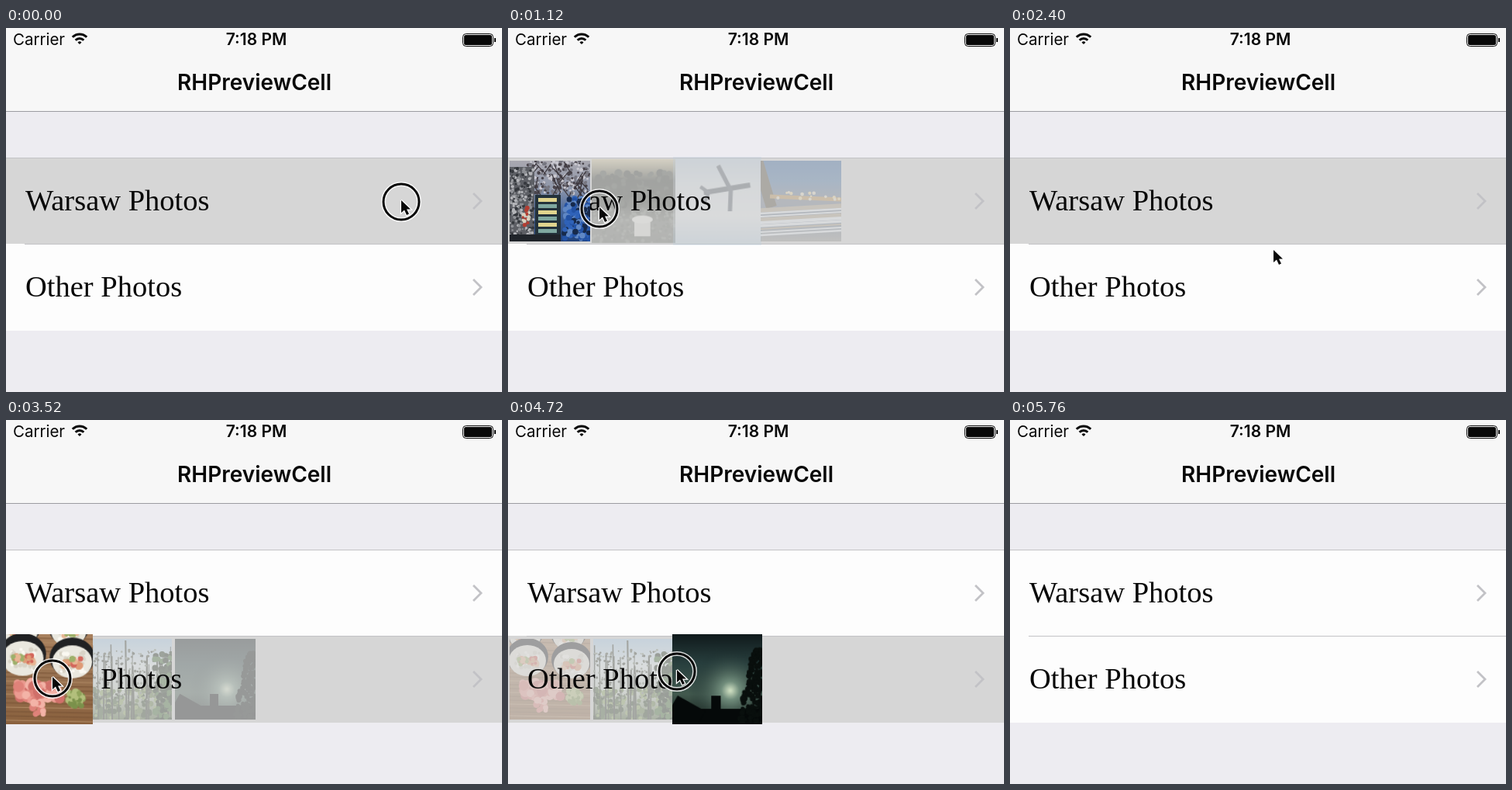
An HTML page with a canvas that plays this animation: 640 by 469 pixels, repeating every 6000 ms.

```html
<!DOCTYPE html>
<html lang="en">
<head>
<meta charset="utf-8">
<title>RHPreviewCell</title>
<style>
  html, body { margin: 0; width: 640px; height: 469px; overflow: hidden; }
  canvas { display: block; }
</style>
</head>
<body>
<canvas id="stage" width="640" height="469"></canvas>
<script>
const c = document.getElementById('stage').getContext('2d');
const LOOP = 6000, STEP = 80, TILE = 104, PITCH = 108, ROW = 112, DIM = 0.3, INK = '#080808';

const mix = (a, b, p) => a + (b - a) * p;
function ease(v) {
  v = Math.max(0, Math.min(1, v));
  return v * v * (3 - 2 * v);
}

let seed = 1;
function random(from, to) {
  seed = seed * 16807 % 2147483647;
  return mix(from, to, seed / 2147483647);
}

function rect(color, x, y, w, h) {
  c.fillStyle = color;
  c.fillRect(x, y, w, h);
}

function oval(color, x, y, rx, ry = rx) {
  c.fillStyle = color;
  c.beginPath();
  c.ellipse(x, y, rx, ry, 0, 0, 7);
  c.fill();
}

function line(color, width, ...points) {
  c.beginPath();
  for (let i = 0; i < points.length; i += 2) c.lineTo(points[i], points[i + 1]);
  c.strokeStyle = color;
  c.lineWidth = width;
  c.stroke();
}

function text(s, x, y, font, align = 'left') {
  c.font = font;
  c.textAlign = align;
  c.fillStyle = INK;
  c.fillText(s, x, y);
}

function sky(...colors) {
  const g = c.createLinearGradient(0, 0, 0, TILE);
  colors.forEach((color, i) => g.addColorStop(i / (colors.length - 1), color));
  rect(g, 0, 0, TILE, TILE);
}

// Random dots filling a box
function scatter(colors, count, x, y, w, h, size) {
  for (let i = 0; i < count; i++) {
    oval(colors[i % colors.length], random(x, x + w), random(y, y + h), random(size / 2, size));
  }
}

// Simplified photos, each in a square of side TILE
function city() {
  sky('#a9a8b0', '#8f97aa', '#3f629c', '#22427a');
  scatter(['#4a454c', '#777781', '#c9c8d0'], 260, 24, 0, 80, 42, 2.4);
  for (let i = 0; i < 30; i++) {
    const x = random(25, 104), y = random(0, 45);
    line('#3c373d', 1.2, x, y, x + random(-14, 14), y + 14);
  }
  rect('#5d5f65', 0, 8, 32, 96);
  scatter(['#35383d', '#8e9095', '#b4b5b9'], 240, 0, 10, 31, 94, 2.2);
  scatter(['#172a4b', '#5f87c4', '#2352a4', '#2f62b8'], 150, 70, 48, 34, 54, 4);
  scatter(['#b33d32', '#d9d2c0'], 14, 17, 60, 10, 24, 3);
  rect('#24323b', 33, 44, 33, 60);
  for (let y = 48; y < 90; y += 8) rect(y % 16 ? '#7fa8a0' : '#e0d48e', 37, y, 24, 5);
  rect('#20242a', 0, 95, 66, 9);
}

function meadow() {
  sky('#d0c297', '#2b3028', '#33372f', '#6d7068', '#62665f');
  scatter(['#2b3028', '#3d4238'], 90, 0, 16, TILE, 42, 5);
  scatter(['#7c8078', '#5f635b'], 200, 0, 62, TILE, 42, 2.5);
  rect('#d8d8d2', 53, 74, 20, 22);
  oval('#e4e4de', 63, 75, 13, 5);
}

function plane() {
  sky('#b9cbdb', '#d7dfe5', '#e2e6e8', '#b9cede');
  line('#4a535e', 6, 36, 42, 91, 33);
  line('#525b66', 5, 53, 10, 68, 39, 67, 64);
  line('#525b66', 4, 32, 35, 42, 42, 37, 53);
}

function night() {
  sky('#2c5c98', '#416d9f', '#6c7584', '#5d7089', '#8f8f8b');
  line('#4f4636', 14, -4, 0, 14, 60);
  line('#b28a4c', 5, 12, 46, TILE, 50);
  scatter(['#e5cf94', '#ddd5bd'], 14, 20, 40, 82, 12, 2.5);
  for (let i = 0; i < 9; i++) line(i % 3 ? '#dfe5ea' : '#a99b84', random(2, 6), 0, 64 + i * 4, TILE, 58 + i * 4);
}

function roll(x, y, r) {
  oval('#202123', x, y - 3, r + 3, r);
  oval('#eae8df', x, y + 2, r, r - 4);
  scatter(['#fbf9f2', '#d8d3c6'], 40, x - r * 0.65, y - r * 0.4, r * 1.3, r, 3);
  scatter(['#df9b76', '#9db06a', '#d3665b', '#e8b694'], 26, x - r / 2, y - 2, r, r / 2.5, 4);
}

function sushi() {
  sky('#a9815e', '#96704f', '#8a613e');
  for (let y = 4; y < TILE; y += 5) line(y % 3 ? '#7a5537' : '#b08a64', 1, 0, y, TILE, y + 2);
  roll(20, -4, 20);
  roll(76, -4, 20);
  roll(23, 26, 24);
  roll(80, 30, 23);
  scatter(['#df8279', '#f3b3a7', '#d0706a', '#eb9a90'], 60, 16, 56, 50, 20, 7);
  scatter(['#df8279', '#f3b3a7'], 18, 34, 76, 14, 18, 5);
  scatter(['#91a45c', '#b3bf7c', '#7b914b'], 50, 76, 66, 16, 18, 4);
}

function trunks(color, count, top) {
  for (let i = 0; i < count; i++) {
    const x = random(0, TILE);
    line(color, random(0.8, 2.2), x, random(0, top), x + random(-2, 2), TILE);
  }
}

function forest() {
  sky('#a7ccea', '#e3edf0', '#c5d0c4', '#50663b');
  scatter(['#425b32', '#5f7a41', '#87a05b', '#2a3d20'], 160, 0, 64, TILE, 40, 4);
  trunks('#30382c', 24, 45);
  scatter(['#30382c', '#4a5140', '#7d8a78'], 200, 0, 14, TILE, 66, 1.8);
  scatter(['#1c3019', '#12200f', '#3d6730'], 120, 82, 18, 22, 86, 4);
}

function dusk() {
  sky('#101a1c', '#29403f', '#42594e', '#101815');
  const glow = c.createRadialGradient(67, 65, 1, 67, 65, 48);
  glow.addColorStop(0, '#cbdcbf');
  glow.addColorStop(0.2, '#718d7c');
  glow.addColorStop(1, '#17282800');
  rect(glow, 0, 0, TILE, TILE);
  rect('#050909', 0, 86, TILE, 18);
  rect('#050909', 45, 71, 11, 20);
  line('#050909', 26, 0, 82, 32, 100);
  for (let y = 18; y < TILE; y += 4) scatter(['#090f0d'], 7, 96 - y / 5, y, 8 + y / 5, 4, 3.5);
}

// The finger goes down at `on` and up at `up`
const rows = [
  { title: 'Warsaw Photos', top: 167, on: 0, up: 2000, photos: [city, meadow, plane, night] },
  { title: 'Other Photos', top: 278, on: 3120, up: 5200, photos: [sushi, forest, dusk] }
];

// Key points of the pointer: time, x, y
const path = [
  [0, 510, 224], [640, 510, 224], [1120, 118, 233], [1200, 60, 234], [1920, 446, 226],
  [2400, 340, 288], [2640, 108, 356], [2800, 60, 333], [4080, 60, 333], [4160, 190, 329],
  [4440, 260, 326], [4720, 218, 324], [5120, 395, 330], [5600, 470, 425]
];

function pointer(t) {
  const i = path.findIndex(key => key[0] > t);
  if (i < 1) return null;
  const [from, to] = [path[i - 1], path[i]];
  const p = (t - from[0]) / (to[0] - from[0]);
  return [mix(from[1], to[1], p), mix(from[2], to[2], p)];
}

// Index of the photo under the finger; touches run slightly ahead of the drawn pointer
function hovered(row, t) {
  if (t < row.on + 120 || t >= row.up) return -1;
  return Math.floor(pointer(t + 20)[0] / PITCH);
}

function drawPointer(t) {
  const at = pointer(t);
  if (!at) return;
  const [x, y] = at;
  if (rows.some(row => t >= row.on - 320 && t < row.up)) {
    for (const [color, width] of [['#ffffffd0', 6], [INK, 3]]) {
      c.beginPath();
      c.arc(x, y, 23, 0, 7);
      c.strokeStyle = color;
      c.lineWidth = width;
      c.stroke();
    }
  }
  c.save();
  c.translate(x, y - 2);
  line('#fff', 2.5, 0, 0, 0, 16, 4, 12.5, 7, 19, 10, 17.5, 7, 11.5, 12, 11.5, 0, 0);
  c.fillStyle = INK;
  c.fill();
  c.restore();
}

function drawTile(row, i, t, lit) {
  const enter = ease((t - row.on - 120 - i * 30) / 150);
  const leave = ease((t - row.up - i * 20) / 180);
  let held = 0;
  for (let k = 1; k <= 3; k++) held += hovered(row, t - k * STEP) === i;
  const size = TILE * (1 + 0.12 * ease(held / 3));
  const x = mix(-60, 54 + i * PITCH, enter * (1 - leave));
  c.globalAlpha = lit ? 1 : DIM;
  c.drawImage(row.images[i], x - size / 2, row.top + ROW / 2 - size / 2, size, size);
  c.globalAlpha = 1;
}

function drawRow(row, t) {
  const pressed = t >= row.on ? 1 - ease((t - row.up - 400) / 140) : 0;
  const v = Math.round(mix(253, 214, pressed));
  rect(`rgb(${v},${v},${v})`, 0, row.top, 640, ROW);
  const y = row.top + ROW / 2;
  line('#c2c2c6', 2.8, 603, y - 10, 613, y, 603, y + 10);
}

// Dimmed photos lie under the title, the lit one covers it
function drawPhotos(row, t) {
  const current = hovered(row, t);
  row.images.forEach((_, i) => i !== current && drawTile(row, i, t, false));
  text(row.title, 25, row.top + 68, '38.5px "Liberation Serif", serif');
  if (row.images[current]) drawTile(row, current, t, true);
}

function drawHeader() {
  rect('#f7f7f7', 0, 0, 640, 107);
  rect('#9c9ca1', 0, 107, 640, 1);
  text('Carrier', 9, 22, '20.5px Inter, sans-serif');
  text('7:18 PM', 323, 22, '600 21px Inter, sans-serif', 'center');
  text('RHPreviewCell', 320.5, 80, '600 28px Inter, sans-serif', 'center');
  c.strokeStyle = INK;
  for (const r of [2, 7.5, 13]) {
    c.beginPath();
    c.arc(95, 21, r, -Math.PI * 0.75, -Math.PI * 0.25);
    c.lineWidth = 3;
    c.stroke();
  }
  c.lineWidth = 1;
  c.beginPath();
  c.roundRect(589.5, 7.5, 39, 16, 4);
  c.stroke();
  c.beginPath();
  c.roundRect(591, 9, 36, 13, 2.5);
  c.fillStyle = INK;
  c.fill();
  rect(INK, 630, 13, 2, 5);
}

function draw(t) {
  rect('#edecf1', 0, 0, 640, 469);
  drawHeader();
  for (const row of rows) drawRow(row, t);
  rect('#c3c3c6', 0, 167, 640, 1);
  rect('#c3c3c6', 24, 278, 616, 1);
  for (const row of rows) drawPhotos(row, t);
  drawPointer(t);
}

function render(paint) {
  const image = document.createElement('canvas');
  image.width = image.height = TILE;
  paint();
  image.getContext('2d').drawImage(c.canvas, 0, 0);
  return image;
}

for (const row of rows) row.images = row.photos.map(render);

const start = performance.now();
function frame() {
  const t = (performance.now() - start) % LOOP;
  draw(Math.floor(t / STEP) * STEP);
  requestAnimationFrame(frame);
}
frame();
</script>
</body>
</html>
```
